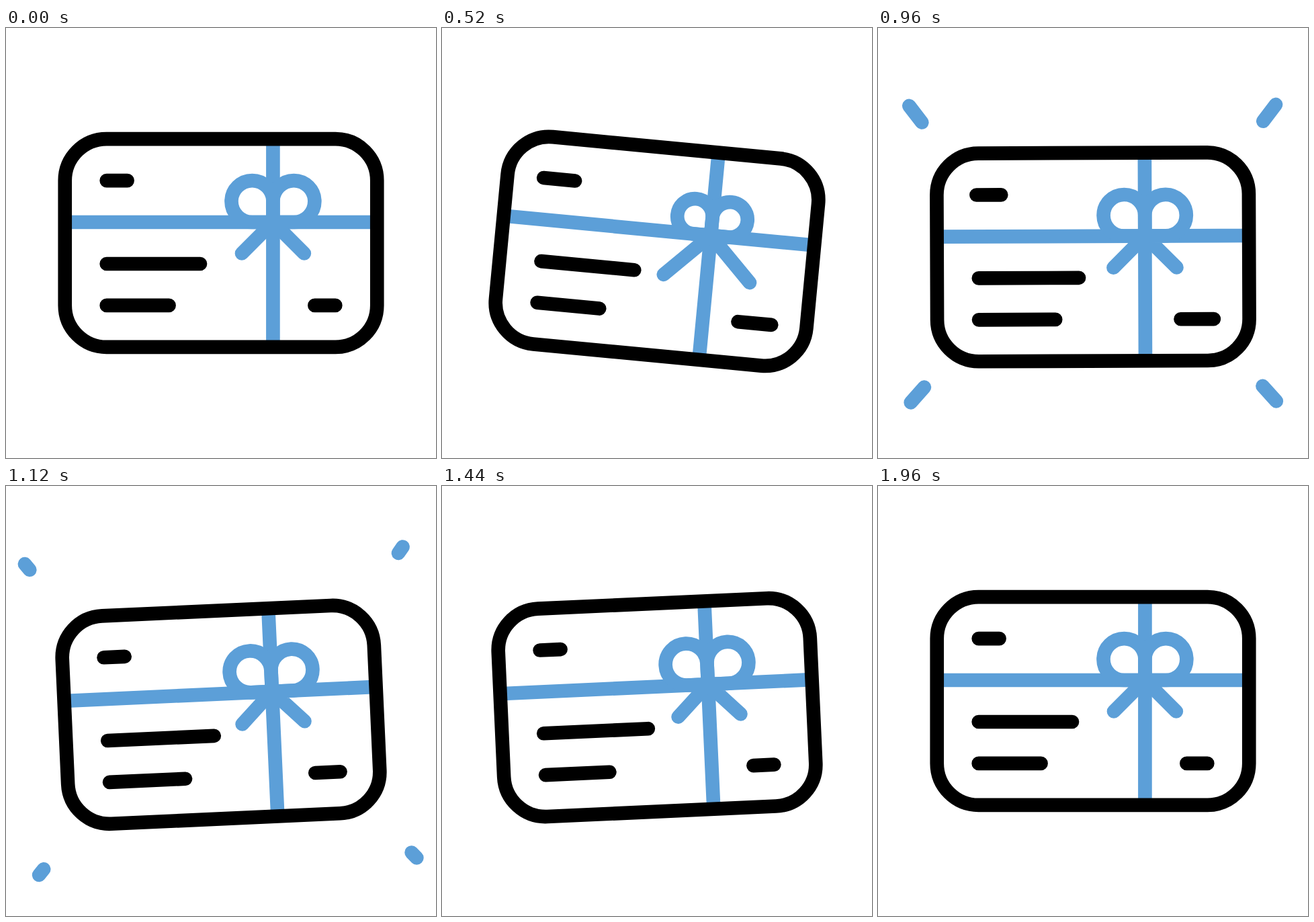
These frames come from a looping animation (640 px wide and 640 px high, 2000 ms). An HTML page:

```html
<!DOCTYPE html>
<html lang="en">
<head>
<meta charset="utf-8">
<title>Gift card</title>
<style>
  html, body { margin: 0; width: 100%; height: 100%; overflow: hidden; background: #fff; }
  svg { display: block; width: 100%; height: 100%; }
</style>
</head>
<body>
<svg viewBox="0 0 640 640" fill="none" stroke-width="20.65" stroke-linecap="round">
  <g id="card">
    <g stroke="#5c9fd8">
      <path id="ribbon" stroke-linecap="butt"/>
      <path id="bow" stroke-linejoin="round"/>
      <path id="sparks"/>
    </g>
    <g stroke="#000">
      <rect id="frame"/>
      <path id="lines"/>
    </g>
  </g>
</svg>
<script>
const LOOP = 2000, STEP = 40;
const U = 640 / 31; // icon grid unit
const el = id => document.getElementById(id);
const clamp = x => Math.min(1, Math.max(0, x));
const span = (t, a, b) => clamp((t - a) / (b - a));
const sine = u => (1 - Math.cos(Math.PI * u)) / 2;
const cubic = u => u < 0.5 ? 4 * u ** 3 : 1 - 4 * (1 - u) ** 3;
const easeOut = (u, power) => 1 - (1 - u) ** power;
const pulse = (t, start, peak, end) =>
  t < peak ? sine(span(t, start, peak)) : 1 - sine(span(t, peak, end));
const hLine = (x1, x2, y) => `M${x1} ${y}H${x2}`;

const knot = { x: 3.75 * U, y: -1.5 * U };
el('ribbon').setAttribute('d',
  `M${knot.x} ${-7.5 * U}V${7.5 * U}M${-11.25 * U} ${knot.y}H${11.25 * U}`);
const frame = { x: -11.25 * U, y: -7.5 * U, width: 22.5 * U, height: 15 * U, rx: 3 * U };
for (const key in frame) el('frame').setAttribute(key, frame[key]);

function bowPath(t) {
  const p = pulse(t, 0, 500, 1020);
  const r = 1.5 * U - 4.8 * p;
  const tail = 2.25 * U + 18 * p;
  return [-1, 1].map(side => {
    const sweep = side < 0 ? 1 : 0;
    return `M${knot.x} ${knot.y}h${side * r}a${r} ${r} 0 1 ${sweep} ${-side * r} ${-r}z` +
      `M${knot.x} ${knot.y}l${side * tail} ${tail}`;
  }).join('');
}

function linesPath(t) {
  const left = -8.25 * U, mid = 7.5 * U, half = 0.75 * U;
  const a = half + 9 * pulse(t, 0, 660, 1150);
  const b = half + 14.5 * pulse(t, 220, 720, 1300);
  const long = -1.5 * U + 23 * pulse(t, 700, 1270, 1740);
  const short = -3.75 * U + 22 * pulse(t, 500, 1020, 1560);
  return hLine(-mid - a, -mid + a, -4.5 * U) +
    hLine(left, long, 1.5 * U) +
    hLine(left, short, 4.5 * U) +
    hLine(mid - b, mid + b, 4.5 * U);
}

function sparksPath(t) {
  const head = easeOut(span(t, 540, 1230), 1.7);
  const tail = easeOut(span(t, 800, 1230), 1.3);
  if (head - tail < 0.02) return '';
  const ray = (x, y, dx, dy) =>
    `M${x + dx * tail} ${y + dy * tail}L${x + dx * head} ${y + dy * head}`;
  return [-1, 1].map(side =>
    ray(side * 229, -168.5, side * 55, -72) +
    ray(side * 225, 163, side * 59, 66)).join('');
}

function draw(t) {
  const angle = 5.65 * cubic(span(t, 80, 640)) -
    8.3 * cubic(span(t, 655, 1180)) +
    2.65 * cubic(span(t, 1335, 1960));
  const drop = 20.8 * (cubic(span(t, 50, 930)) - cubic(span(t, 955, 1900)));
  el('card').setAttribute('transform', `translate(320 ${320 + drop}) rotate(${angle})`);
  el('bow').setAttribute('d', bowPath(t));
  el('lines').setAttribute('d', linesPath(t));
  el('sparks').setAttribute('d', sparksPath(t));
}

const begin = performance.now();
function tick() {
  const t = (performance.now() - begin) % LOOP;
  draw(Math.floor(t / STEP) * STEP);
  requestAnimationFrame(tick);
}
tick();
</script>
</body>
</html>
```
